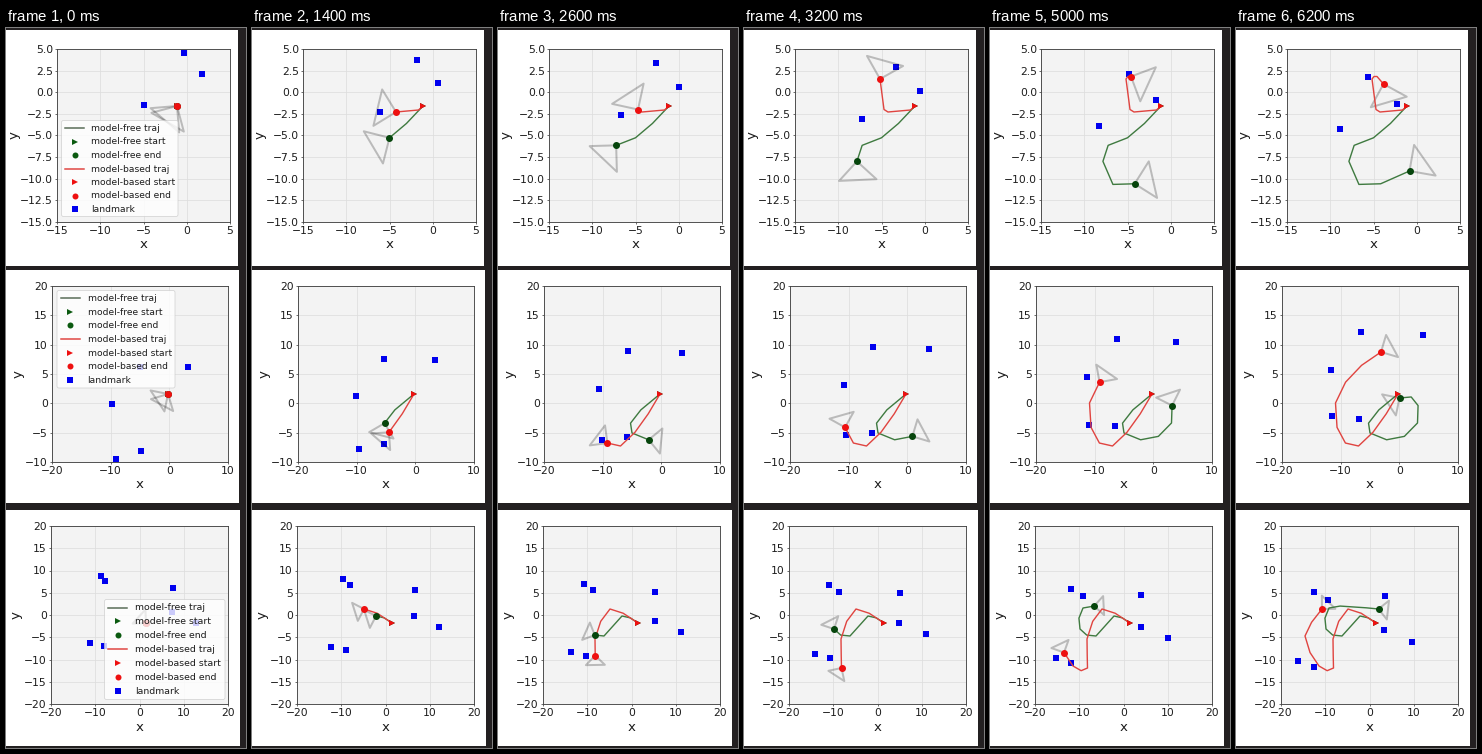
These frames come from a looping animation (240x720 px, 6.3 s). A matplotlib script:

```python
import numpy as np
import matplotlib.pyplot as plt
from matplotlib.animation import FuncAnimation
from matplotlib.patches import FancyBboxPatch, Rectangle
from matplotlib.transforms import Affine2D

W, H, DPI = 240, 720, 100
FRAMES, INTERVAL = 63, 100
FIRST_STEP = 450
PT = 72 / DPI  # points per pixel

GREEN, RED, BLUE = "#06450c", "#ee1010", "#0000ee"
GREEN_LINE, RED_LINE = "#3f7a40", "#e04440"
INK = "#1c1c1c"

LEGEND = [
    ("model-free traj", None, "#566a55"),
    ("model-free start", ">", "#0b5a10"),
    ("model-free end", "o", "#0b5a10"),
    ("model-based traj", None, RED_LINE),
    ("model-based start", ">", RED),
    ("model-based end", "o", RED),
    ("landmark", "s", BLUE),
]

plt.rcParams["font.family"] = "DejaVu Sans"
fig = plt.figure(figsize=(W / DPI, H / DPI), dpi=DPI, facecolor="#232021")
# stage pixels, origin at the top left
stage = Affine2D().scale(1, -1).translate(0, H)


def smooth_path(keys, steps):
    """Sample a Catmull-Rom curve through evenly timed key points."""
    keys = np.array(keys, float)
    ends = 2 * keys[[0, -1]] - keys[[1, -2]]
    k = np.vstack([ends[:1], keys, ends[1:]])
    t = np.linspace(0, len(keys) - 1, steps + 1)
    i = np.minimum(t.astype(int), len(keys) - 2)
    u = (t - i)[:, None]
    a, b, c, d = (k[i + n] for n in range(4))
    return b + u / 2 * (c - a + u * (2 * a - 5 * b + 4 * c - d
                                     + u * (3 * (b - c) + d - a)))


def headings(path):
    """Arc motion: a heading lies midway between neighbouring chords."""
    dx, dy = np.diff(path, axis=0).T
    chord = np.unwrap(np.arctan2(-dy, dx))
    chord = np.concatenate([[2 * chord[0] - chord[1]], chord,
                            [2 * chord[-1] - chord[-2]]])
    return (chord[:-1] + chord[1:]) / 2


def make_axes(box, sheet, xticks, yticks, decimals, xlabel, ylabel):
    """Plot area on its white sheet; boxes are left, top, right, bottom."""
    l, t, r, b = sheet
    fig.add_artist(Rectangle((l, t), r - l, b - t, transform=stage,
                             facecolor="white", edgecolor="none", zorder=-1))
    l, t, r, b = box
    ax = fig.add_axes([l / W, 1 - b / H, (r - l) / W, (b - t) / H],
                      facecolor="#f3f3f3")
    ax.set_xlim(xticks[0], xticks[-1])
    ax.set_ylim(yticks[0], yticks[-1])
    ax.set_xticks(xticks)
    ax.set_yticks(yticks)
    ax.yaxis.set_major_formatter(
        lambda v, _: f"{v:.{decimals}f}".replace("-", "\u2212"))
    ax.tick_params(length=2 * PT, width=0.7 * PT, pad=2.1 * PT,
                   labelsize=10.8 * PT, color="#333333", labelcolor=INK)
    ax.grid(color="#dedede", linewidth=0.8 * PT)
    ax.set_axisbelow(True)
    for spine in ax.spines.values():
        spine.set(linewidth=0.9 * PT, color="#444444")
    style = dict(transform=stage, fontsize=13.4 * PT, color=INK, ha="center")
    fig.text(*xlabel, "x", va="baseline", **style)
    fig.text(*ylabel, "y", va="center", rotation=90, **style)
    return ax


def make_legend(ax, box, first, gap, size, mid, left):
    l, t, r, b = box
    items = [ax.add_patch(FancyBboxPatch(
        (l + 2, t + 2), r - l - 4, b - t - 4,
        boxstyle="round,pad=2,rounding_size=2", transform=stage,
        facecolor=(1, 1, 1, 0.8), edgecolor=(0.8, 0.8, 0.8, 0.8),
        linewidth=0.8 * PT, zorder=10))]
    for i, (label, marker, color) in enumerate(LEGEND):
        y = first + i * gap
        if marker:
            items += ax.plot([mid], [y], marker, color=color, ms=6 * PT,
                             mew=0, transform=stage, zorder=11)
        else:
            items += ax.plot([mid - 9.5, mid + 9.5], [y, y], color=color,
                             lw=1.5 * PT, transform=stage, zorder=11)
        items.append(ax.text(left, y + 3, label, transform=stage,
                             fontsize=size * PT, color=INK,
                             va="baseline", zorder=11))
    return items


class Robot:
    def __init__(self, ax, keys, steps, reach, color, line_color, z):
        self.path = smooth_path(keys, steps)
        self.turns = headings(self.path)
        self.reach = reach

        def draw(*fmt, **kw):
            return ax.plot([], [], *fmt, transform=stage, **kw)[0]

        self.view = draw(color="black", alpha=0.23, lw=2 * PT, zorder=3,
                         solid_joinstyle="round")
        self.trail = draw(color=line_color, lw=1.4 * PT, zorder=z)
        self.start = draw(">", color=color, ms=6.6 * PT, mew=0, zorder=z + 0.2)
        self.end = draw("o", color=color, ms=7 * PT, mew=0, zorder=z + 1)
        self.start.set_data(*self.path[:1].T)

    def show(self, step):
        here = self.path[step]
        angles = self.turns[step] + np.array([-1, 1]) * np.pi / 4
        tips = here + self.reach * np.column_stack(
            [np.cos(angles), -np.sin(angles)])
        self.view.set_data(*np.vstack([here, tips, here]).T)
        self.trail.set_data(*self.path[:step + 1].T)
        self.end.set_data([here[0]], [here[1]])


class Panel:
    """Two robots among landmarks that drift from one place to another."""

    def __init__(self, ax, steps, period, reach, free, based, marks, ease,
                 legend):
        self.steps, self.period = steps, period
        self.ease, self.legend = ease, legend
        self.origin, self.goal = np.array(marks, float).swapaxes(0, 1)
        self.squares = ax.plot([], [], "s", color=BLUE, ms=6 * PT, mew=0,
                               transform=stage, zorder=2)[0]
        self.robots = [
            Robot(ax, free, steps, reach, GREEN, GREEN_LINE, 4),
            Robot(ax, based, steps, reach, RED, RED_LINE, 4.5)]

    def show(self, ms):
        step = max(0, int((ms - FIRST_STEP) // self.period) + 1)
        step = min(step, self.steps)
        for robot in self.robots:
            robot.show(step)
        done = 1 - (1 - step / self.steps) ** self.ease
        spots = self.origin + (self.goal - self.origin) * done
        self.squares.set_data(*spots.T)
        for item in self.legend:
            item.set_visible(step == 0)


tens, fives = np.arange(-20, 21, 10), np.arange(-20, 21, 5)
ax1 = make_axes((51, 21, 224, 194), (0, 2, 232, 238),
                np.arange(-15, 6, 5), np.arange(-15, 5.1, 2.5), 1,
                (138, 220.5), (8, 107))
ax2 = make_axes((46, 258, 222, 434), (0, 242, 233, 475),
                tens[:4], fives[2:], 0, (134, 460.5), (12, 346))
ax3 = make_axes((45, 498, 222, 676), (0, 482, 234, 718),
                tens, fives, 0, (134, 703), (10, 587))

panels = [
    Panel(ax1, steps=7, period=900, reach=26.5,
          free=[(171, 78), (142, 107), (113, 123), (127, 159), (173.5, 143)],
          based=[(171, 78), (166.5, 82), (144, 84), (140, 81.5), (136, 51),
                 (138, 48.5), (141, 48.5), (147.5, 56)],
          marks=[[(137.5, 76.5), (104, 101)],
                 [(177.5, 25), (132, 49)],
                 [(196, 46), (161, 76)]],
          ease=1,
          legend=make_legend(ax1, (55.5, 92.5, 172, 188.5),
                             100, 13.5, 9.15, 68.5, 85)),
    Panel(ax2, steps=9, period=680, reach=17.8,
          free=[(162, 366), (136, 389), (134, 405), (160, 412), (181.5, 395),
                (179.5, 371), (163.5, 370)],
          based=[(162, 366), (144, 395), (122.5, 418), (104.5, 409),
                 (99.5, 375), (117, 345), (145, 324)],
          marks=[[(182, 339), (186.5, 307)],
                 [(134, 339), (125, 303.5)],
                 [(106, 376), (95, 341.5)],
                 [(135, 422.5), (122.5, 391)],
                 [(110, 430.5), (95.5, 388)]],
          ease=1,
          legend=make_legend(ax2, (51, 262.5, 169, 360),
                             270, 13.65, 9.15, 64, 81.5)),
    Panel(ax3, steps=12, period=520, reach=13.4,
          free=[(140, 595), (124, 588), (106, 608), (90, 601), (93, 580),
                (118, 579), (142.5, 581)],
          based=[(140, 595), (112, 581), (97, 611), (97.5, 640), (83, 638),
                 (69, 608), (86, 581)],
          marks=[[(95, 548), (78, 563.5)],
                 [(99, 553), (92, 571.5)],
                 [(166.5, 560), (148.5, 568)],
                 [(166, 584), (148, 602)],
                 [(190, 595), (176, 613.5)],
                 [(83.5, 615), (62, 633)],
                 [(98, 618), (77.5, 638.5)]],
          ease=1.3,
          legend=make_legend(ax3, (98.5, 571.5, 219, 671.5),
                             579.5, 13.9, 9.4, 111.5, 129)),
]


def update(frame):
    for panel in panels:
        panel.show(frame * INTERVAL)
    return []


anim = FuncAnimation(fig, update, frames=FRAMES, interval=INTERVAL,
                     init_func=lambda: update(0), repeat=True, repeat_delay=0)
plt.show()
```
